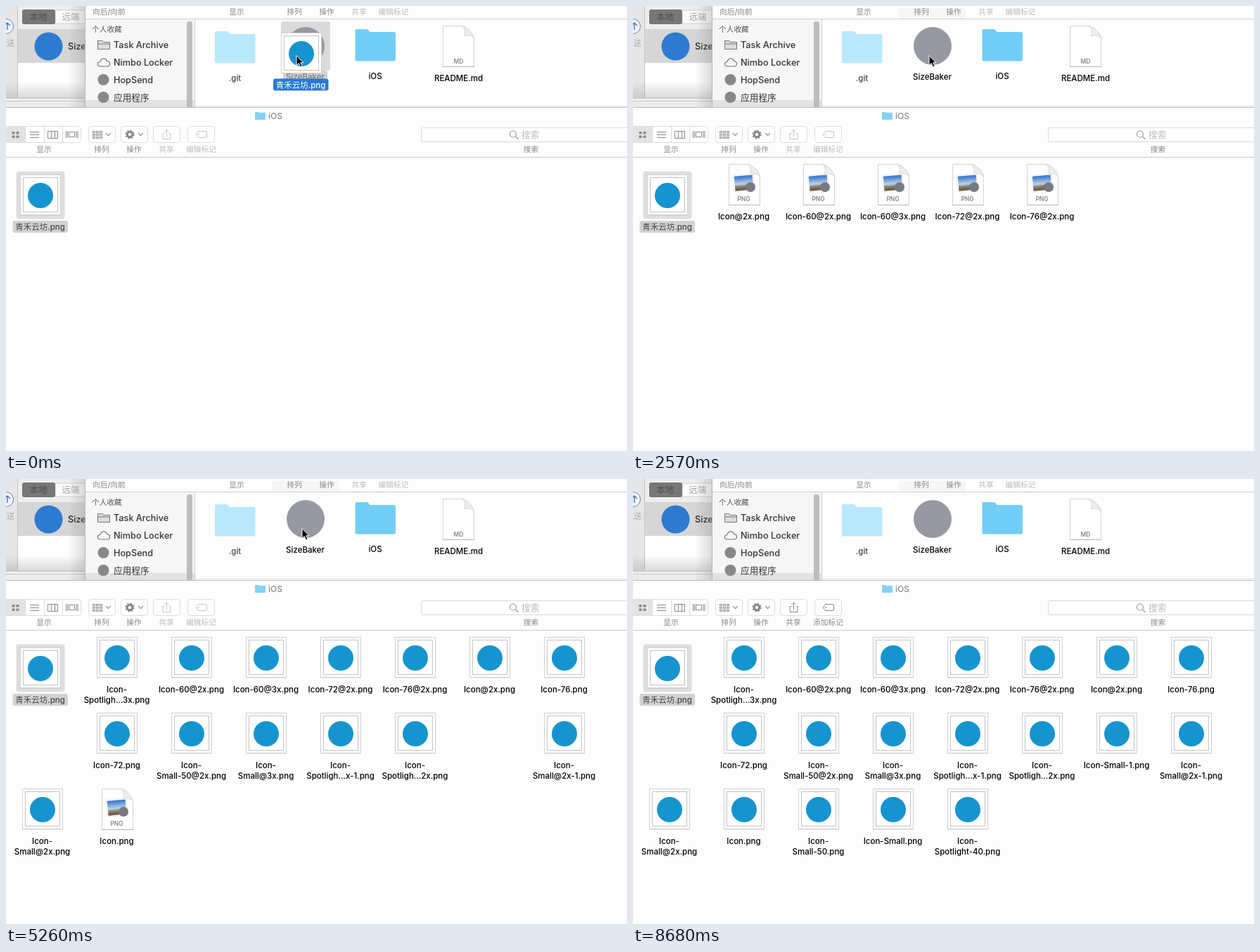
An HTML page that plays this animation: 883 px wide and 634 px high, repeating every 9.43 s.

```html
<!DOCTYPE html>
<html lang="zh">
<head>
<meta charset="utf-8">
<style>
html, body { margin: 0; width: 100%; height: 100%; overflow: hidden; background: #fdfdfd; }
svg { display: block; width: 883px; height: 634px; font-family: Inter, "Noto Sans CJK SC", "Noto Sans CJK", sans-serif; }
</style>
</head>
<body>
<svg viewBox="0 0 883 634">
  <defs>
    <linearGradient id="edge"><stop offset="0" stop-color="#888" stop-opacity="0"/><stop offset="1" stop-color="#888" stop-opacity=".3"/></linearGradient>
    <linearGradient id="foot" x2="0" y2="1"><stop offset="0" stop-color="#888" stop-opacity="0"/><stop offset="1" stop-color="#888" stop-opacity=".3"/></linearGradient>
    <linearGradient id="photo" x2="0" y2="1"><stop offset=".1" stop-color="#477fce"/><stop offset=".55" stop-color="#b9d3ee"/><stop offset=".75" stop-color="#8a795f"/><stop offset="1" stop-color="#5d5547"/></linearGradient>
    <g id="page">
      <path d="M.5.5H28C36 3 43 11 44.500 18V58.500H.5Z" fill="#fff" stroke="#d4d4d4"/>
      <path d="M0 58.500H45" stroke="#b5b5b5"/>
      <path d="M28 .5C32 5 32 10 30 15 36 13 41 14 44.500 18 43 11 36 3 28 .5Z" fill="#ededed" stroke="#d2d2d2" stroke-width=".8"/>
    </g>
    <g id="thumb">
      <rect x=".5" y="1.500" width="57" height="57" fill="#aaa" opacity=".45"/>
      <rect x=".5" y=".5" width="57" height="57" fill="#fff" stroke="#d0d0d0"/>
      <rect x="4.500" y="4.500" width="49" height="49" fill="#fff" stroke="#c3c3c3"/>
      <circle cx="29" cy="30" r="18" fill="#1694cf"/>
    </g>
    <g id="png">
      <use href="#page"/>
      <g transform="rotate(-5 22 26)"><rect x="7" y="15" width="29" height="24" fill="#fff" stroke="#ddd" stroke-width=".6"/><rect x="8.500" y="16.500" width="26" height="21" fill="url(#photo)"/></g>
      <circle cx="31" cy="33" r="7" fill="#777b80"/>
    </g>
    <path id="folder" d="M0 2Q0 0 2 0H16Q18 0 19 1.500L21 4H55.500Q57.500 4 57.500 6.500V43Q57.500 45.500 55 45.500H2.500Q0 45.500 0 43Z"/>
    <path id="cursor" d="M0 0V14L3.300 11 5.500 16.400 8 15.300 5.800 10.200H10Z" fill="#000" stroke="#fff" stroke-width="1" stroke-linejoin="round"/>
  </defs>
  <g id="back"></g>
  <g id="live"></g>
</svg>
<script>
const LOOP = 9430, NEVER = 1e9, PX = 11.5;
const $ = id => document.getElementById(id);
const rect = (x, y, w, h, fill, more = '') => `<rect x="${x}" y="${y}" width="${w}" height="${h}" fill="${fill}" ${more}/>`;
const line = (d, color, w = 1) => `<path d="${d}" fill="none" stroke="${color}" stroke-width="${w}"/>`;
const text = (s, x, y, color = '#000', size = PX, anchor = 'middle', weight = 450) =>
  `<text x="${x}" y="${y}" fill="${color}" font-size="${size}" text-anchor="${anchor}" font-weight="${weight}">${s}</text>`;
const use = (id, x, y, more = '') => `<use href="#${id}" transform="translate(${x} ${y})" ${more}/>`;
const dot = (x, y, r, fill) => `<circle cx="${x}" cy="${y}" r="${r}" fill="${fill}"/>`;
const button = (x, w) => rect(x + .5, 171.5, w, 23, '#fff', 'rx="4" stroke="#dcdcdc"');
const chevron = x => line(`M${x} 181l3.500 3.500 3.500-3.500`, '#999', 1.3);

function leftWindow() {
  return rect(0, 0, 113, 145, '#f1f1f1') + rect(0, 0, 16, 131, '#e6e6e6') +
    rect(16, 0, 97, 33, '#eee') + rect(16, 33, 97, 48, '#d6d6d6') + rect(16, 81, 97, 49, '#fefefe') +
    rect(70, 6, 43, 19, '#fafafa', 'stroke="#d0d0d0"') + rect(23, 5, 47, 21, '#777', 'rx="3"') +
    text('本地', 46, 20, '#505050', 12.5) + text('远端', 92, 20, '#a0a0a0', 12.5) +
    `<circle cx="0" cy="29" r="10.500" fill="#f3f6fb" stroke="#6583b5"/>` +
    line('M2 34v-9M-2 28l4-4 4 4', '#4d70ad', 1.4) + text('推送', 12, 57, '#aaa', 11, 'end') +
    dot(60.5, 57.5, 20, '#2d7bd0') + text('Size', 88, 62, '#222', 12.7, 'start') +
    line('M16.500 0V131M0 131.500H113M0 135.500H113', '#c4c4c4') + rect(0, 136, 113, 9, '#ececec') +
    rect(88, 0, 25, 145, 'url(#edge)') + rect(0, 108, 113, 23, 'url(#foot)') + line('M112.500 0V145', '#b5b5b5');
}

function sidebar() {
  const rows = ['Task Archive', 'Nimbo Locker', 'HopSend', '应用程序'];
  return rect(113, 19, 155, 126, '#f6f6f6') + rect(113, 134, 155, 11, '#e2e2e2') +
    text('个人收藏', 122, 37, '#555', 10.7, 'start', 500) +
    rows.map((s, i) => text(s, 153, 60 + 25 * i, '#333', 12.7, 'start')).join('') +
    `<path d="M130.500 61.500V49.500H137l1.500 2H147.500V61.500ZM130.500 54H147.500" fill="#ddd" stroke="#777"/>` +
    line('M134.500 86C129 86 129 79.500 134 79.500 135 73.500 142 73.500 143.500 78.500 148.500 78 149 86 144 86Z', '#777', 1.2) +
    dot(138.5, 105, 8, '#888') + dot(138.5, 130, 8, '#888') +
    rect(257, 22, 8, 123, '#bdbdbd', 'rx="3"');
}

function topWindow() {
  const tools = [['显示', 328, '#888'], ['排列', 410, '#888'], ['操作', 456, '#888'], ['共享', 502, '#bbb'], ['编辑标记', 551, '#bbb']];
  return rect(113, 0, 770, 145, '#fdfdfd') + sidebar() +
    line('M113 18.500H883M268.500 19V145', '#cfcfcf') + line('M269 142.500H883', '#e2e2e2') +
    text('向后/向前', 123, 12, '#888', 10.7, 'start') +
    tools.map(([s, x, c]) => text(s, x, 12, c, 10.7)).join('') +
    use('folder', 297, 36, 'fill="#b9e8fc"') + use('folder', 496.5, 33, 'fill="#72cef7"') +
    use('page', 621, 28) + text('MD', 643.5, 82, '#777', 8.5) +
    text('.git', 325.5, 107, '#444') + text('iOS', 525, 104) + text('README.md', 643.5, 107);
}

function bottomWindow() {
  let s = rect(0, 145, 883, 489, '#fdfdfd') + line('M0 144.500H883', '#b8b8b8') + line('M0 215.500H883', '#c9c9c9') +
    `<use href="#folder" transform="translate(354 151) scale(.26 .24)" fill="#85d2f5"/>` +
    text('iOS', 383, 161, '#8c8c8c', 12) +
    rect(-5, 171.5, 111.5, 23, '#fff', 'rx="4" stroke="#dcdcdc"') + rect(0, 172, 27, 22, '#e3e3e3') +
    line('M27.500 172V194M54.500 172V194M80.500 172V194', '#ddd');
  for (let i = 0; i < 4; i++) s += rect(8.5 + i % 2 * 6, 179 + (i >> 1) * 5.5, 4, 3.5, '#888', 'rx="1"');
  s += line('M34 179.500h13M34 183.500h13M34 187.500h13', '#888') +
    line('M59.500 178.500h14v10h-14ZM64.500 179v9M69.500 179v9', '#888') +
    line('M89.500 179.500h8v7h-8ZM85.500 178v10M87.500 178v10M100 178v10M102 178v10', '#888') +
    button(117, 38) + button(163, 38) + chevron(142) + chevron(188);
  for (let i = 0; i < 9; i++) s += rect(123.5 + i % 3 * 5, 178.5 + (i / 3 | 0) * 4, 3, 2, 'none', 'stroke="#888" stroke-width=".9"');
  s += '<circle cx="176" cy="183" r="3.800" fill="none" stroke="#888" stroke-width="3"/>' +
    '<circle cx="176" cy="183" r="5.600" fill="none" stroke="#888" stroke-width="2" stroke-dasharray="2.200"/>' +
    rect(590.5, 173.5, 300, 20, '#fff', 'rx="2" stroke="#d9d9d9"') +
    '<circle cx="721" cy="182.500" r="4.500" fill="none" stroke="#999" stroke-width="1.200"/>' +
    line('M724.500 186l4 4', '#999', 1.3) + text('搜索', 733, 188, '#bbb', 12.7, 'start') +
    text('显示', 54, 208, '#888', 10.7) + text('排列', 136, 208, '#888', 10.7) +
    text('操作', 182, 208, '#888', 10.7) + text('搜索', 746.5, 208, '#888', 10.7) +
    rect(14.5, 235.5, 69, 68, '#dedede', 'rx="4"') + use('thumb', 20, 240) +
    rect(9.5, 306, 78.5, 17, '#d2d2d2', 'rx="3"') + text('青禾云坊.png', 48.5, 319, '#444');
  return s;
}

// column, row, label, shown at, preview at, gone at
const files = [
  [1, 0, '青禾云坊副本.png', 1820, NEVER, 2570],
  [1, 0, 'Icon@2x.png', 2570, NEVER, 3320],
  [1, 0, 'Icon-|Spotligh…3x.png', 3320, 4220],
  [2, 0, 'Icon-60@2x.png', 2570, 3770],
  [3, 0, 'Icon-60@3x.png', 2570, 3320],
  [4, 0, 'Icon-72@2x.png', 2570, 3320],
  [5, 0, 'Icon-76@2x.png', 2570, 3320],
  [6, 0, 'Icon@2x.png', 3320, 3770],
  [7, 0, 'Icon@2x副本.png', 3320, NEVER, 4220],
  [7, 0, 'Icon-76.png', 4220, 5260],
  [1, 1, 'Icon-72.png', 4220, 5260],
  [2, 1, 'Icon-|Small-50@2x.png', 4220, 5260],
  [3, 1, 'Icon-|Small@3x.png', 4220, 5260],
  [4, 1, 'Icon-|Spotligh…x-1.png', 5260, 0],
  [5, 1, 'Icon-|Spotligh…2x.png', 5260, 0],
  [6, 1, 'Icon-Small-1.png', 6610, 0],
  [7, 1, 'Icon-|Small@2x-1.png', 5260, 0],
  [0, 2, 'Icon-|Small@2x.png', 5260, 0],
  [1, 2, 'Icon.png', 5260, 6010],
  [2, 2, 'Icon-|Small-50.png', 6610, 0],
  [3, 2, 'Icon-Small.png', 6610, 0],
  [4, 2, 'Icon-|Spotlight-40.png', 6610, 0]
];

function file(t, [col, row, label, from, preview, until = NEVER]) {
  if (t < from || t >= until) return '';
  const x = 51.5 + 106 * col, y = 225 + 108 * row;
  const icon = t >= preview ? use('thumb', x - 28.5, y)
    : use('png', x - 21.5, y) + text('PNG', x, y + 53, '#777', 8.5);
  return icon + label.split('|').map((s, i) => text(s, x, y + 79 + 15 * i)).join('');
}

function dragX(t) {
  return t < 150 ? 0 : t < 310 ? 3 : t < 470 ? 6 : 8;
}

function pointer(t) {
  if (t >= 8680) return '';
  let x = 413 + dragX(t), y = 70.5;
  if (t >= 6610) [x, y] = [536.5, 224];
  if (t >= 6750) {
    const step = t < 7500 ? 0 : Math.min(8, 1 + Math.floor((t - 7500) / 148.57));
    x = 650 + 226 * step / 8;
    y = 345 + 273 * step / 8;
  }
  return use('cursor', x, y);
}

function appIcon(t) {
  const held = t < 790, dx = dragX(t);
  let s = t >= 1080 ? rect(378, 3, 95, 15, '#888', 'opacity=".06"') : '';
  if (held) s += rect(391, 22, 70, 70, '#dadada', 'rx="4"') + rect(394, 92, 63, 17, '#d2d2d2', 'rx="3"');
  s += dot(426, 57, 27, '#9799a2') + text('SizeBaker', 425.5, 105, held ? '#777' : '#000');
  if (held) s += use('thumb', 391 + dx, 38) + rect(380 + dx, 103.5, 78.5, 17, '#2b78d8', 'rx="3"') +
    text('青禾云坊.png', 419 + dx, 116.5, '#fff', PX, 'middle', 500);
  return s;
}

function tagTools(t) {
  const on = t >= 6310, ink = on ? '#888' : '#c4c4c4', label = on ? '#888' : '#bbb';
  return button(209, 38) + button(258, 38) +
    line('M225.500 181.500h-2.500v8h11v-8h-2.500M228.500 186v-9.500M225.500 179l3-3 3 3', ink) +
    line('M270 183l3.500-4.500H284q1.500 0 1.500 1.500v6q0 1.500-1.500 1.500H273.500Z', ink) + dot(274, 183, 1, ink) +
    text('共享', 228, 208, label, 10.7) +
    text(on ? '添加标记' : '编辑标记', 277.5, 208, label, 10.7);
}

$('back').innerHTML = leftWindow() + topWindow() + bottomWindow();
let shown;
function draw(now) {
  const t = now % LOOP;
  const next = appIcon(t) + tagTools(t) + files.map(f => file(t, f)).join('') + pointer(t);
  if (next !== shown) $('live').innerHTML = shown = next;
  requestAnimationFrame(draw);
}
draw(0);
</script>
</body>
</html>
```
